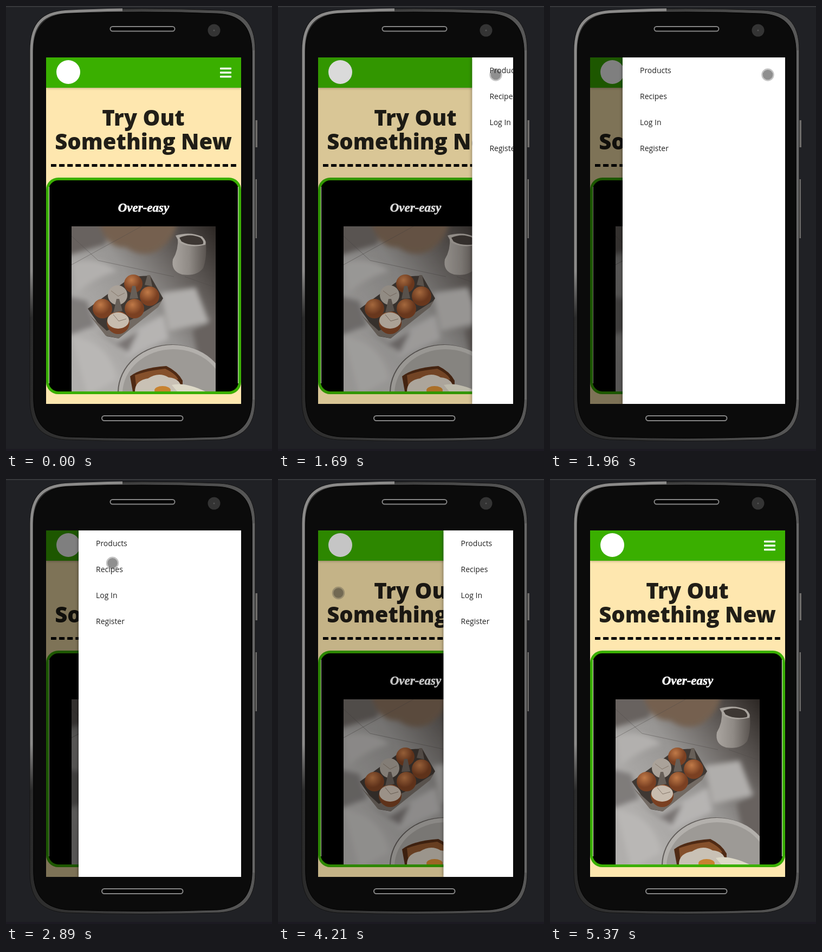
Write an HTML page that moves like this. It is 491 px wide and 822 px high and loops after 5770 ms.

```html
<!DOCTYPE html>
<html lang="en">
<head>
<meta charset="utf-8">
<title>Mobile menu</title>
<style>
  html, body { margin: 0; width: 100%; height: 100%; overflow: hidden; background: #202125; }
  svg { display: block; width: 491px; height: 822px; }
  .title { font: 800 40px "Open Sans", sans-serif; fill: #211e17; text-anchor: middle; }
  .dish { font: italic bold 23px "Liberation Serif", serif; fill: #fff; stroke: #fff; stroke-width: .6px; text-anchor: middle; }
  .menu { font: 14px "Open Sans", sans-serif; fill: #212121; }
  .bar { filter: drop-shadow(0 1px 2px #0004); }
  .panel { filter: drop-shadow(0 1px 3px #0007); }
</style>
</head>
<body>
<svg viewBox="0 0 491 822">
  <defs>
    <path id="body" d="M44 82C44 28 70 10 110 8Q252 2 394 8C434 10 460 28 460 82V727C460 780 434 798 394 801Q252 806 110 801C70 798 44 780 44 727Z"/>
    <clipPath id="screen"><path d="M74 95h360v640H74z"/></clipPath>
    <clipPath id="photo"><path d="M121 407h266v305H121z"/></clipPath>
    <linearGradient id="rim">
      <stop stop-color="#2b2b2b"/>
      <stop offset="1" stop-color="#585858"/>
    </linearGradient>
    <linearGradient id="edge" x2="0" y2="1">
      <stop offset=".85" stop-color="#8c8b8a"/>
      <stop offset="1" stop-color="#2b2b2b"/>
    </linearGradient>
    <linearGradient id="cloth" x1="1" y1="0" x2=".15" y2=".7">
      <stop stop-color="#2c2724"/>
      <stop offset=".3" stop-color="#625d5a"/>
      <stop offset=".6" stop-color="#979593"/>
      <stop offset="1" stop-color="#b0aeac"/>
    </linearGradient>
    <radialGradient id="shell" cx=".4" cy=".3">
      <stop stop-color="#c07a48"/>
      <stop offset="1" stop-color="#7a4022"/>
    </radialGradient>
    <linearGradient id="ceramic">
      <stop stop-color="#aaa5a0"/>
      <stop offset=".5" stop-color="#8f8a85"/>
      <stop offset="1" stop-color="#5a5450"/>
    </linearGradient>
    <filter id="soft"><feGaussianBlur stdDeviation="5"/></filter>
  </defs>

  <!-- phone -->
  <path d="M0 0h491v2H0z" fill="#37383b"/>
  <path d="M0 818h491v4H0z" fill="#1c1a22"/>
  <path d="M459 211h5v50h-5zM459 320h4v109h-4z" fill="#6f6d6b"/>
  <use href="#body" fill="url(#rim)" stroke="#141414"/>
  <path d="M47 575V82C47 30 72 13 110 10.500Q160 8 215 7" fill="none" stroke="url(#edge)" stroke-width="5"/>
  <path d="M457 82V727" stroke="#666" stroke-width="4"/>
  <use href="#body" fill="#0b0b0b" stroke="#000" transform="translate(252.500 405) scale(.97 .986) translate(-252 -404.500)"/>
  <g fill="#050505" stroke="#858585" stroke-width="2">
    <rect x="192.500" y="38" width="119" height="8.500" rx="4.250"/>
    <rect x="177" y="757" width="149.500" height="9" rx="4.500"/>
  </g>
  <circle cx="384" cy="45" r="11.500" fill="#343434"/>
  <circle cx="384" cy="45" r="1.500" fill="#555"/>

  <g clip-path="url(#screen)">
    <path d="M74 95h360v640H74z" fill="#fee7af"/>
    <path class="bar" d="M74 95h360v56H74z" fill="#3aaf00"/>
    <circle cx="115" cy="122" r="22" fill="#fff"/>
    <g fill="#fff">
      <rect x="395" y="113.800" width="21" height="3.400" rx=".8"/>
      <rect x="395" y="121.300" width="21" height="3.400" rx=".8"/>
      <rect x="395" y="128.800" width="21" height="3.400" rx=".8"/>
    </g>
    <text class="title" x="253.500" y="221">Try Out</text>
    <text class="title" x="253.500" y="265">Something New</text>
    <path d="M83 294.500h342" stroke="#000" stroke-width="5" stroke-dasharray="10 5.090"/>

    <rect x="76.500" y="319.500" width="355" height="395" rx="20" stroke="#3aaf00" stroke-width="5"/>
    <path d="M79.500 334v363M428.500 334v363" stroke="#e9e5db"/>
    <text class="dish" x="254" y="380">Over-easy</text>

    <g clip-path="url(#photo)">
      <path d="M121 407h266v305H121z" fill="url(#cloth)"/>
      <g filter="url(#soft)">
        <path d="M110 400H185V440L110 462Z" fill="#67625f"/>
        <path d="M172 400H316Q310 432 280 452Q250 466 222 446Q185 448 172 400Z" fill="#75614f"/>
        <path d="M121 475Q170 460 205 490Q165 500 130 530Z" fill="#b2b0ae"/>
        <path d="M110 535L150 545L165 590L110 610Z" fill="#7f7c7a"/>
        <path d="M285 530L350 520L375 585L300 600Z" fill="#b0aeac"/>
        <path d="M345 600L395 570V720H370Z" fill="#67625f"/>
        <path d="M200 620L290 570L300 615L225 650Z" fill="#b6b4b2"/>
        <path d="M121 610Q190 620 205 690L150 720Z" fill="#b9b7b5"/>
        <path d="M160 595L205 622L245 600L225 640Z" fill="#797573"/>
      </g>
      <path d="M121 478L250 407M121 425L170 470L310 500M330 500L387 520" fill="none" stroke="#4f4a47" opacity=".45"/>

      <path d="M317 427Q319 450 308 468Q304 490 325 496Q352 500 364 484Q371 466 369 436L362 425Z" fill="url(#ceramic)"/>
      <path d="M313 424Q340 416 362 426Q371 434 368 441Q340 448 320 437Z" fill="#a9a49e"/>
      <path d="M320 428Q340 419 359 428Q367 436 363 440Q340 444 324 435Z" fill="#3d3733"/>

      <path d="M151 559L232 500L266 498L290 540L280 555L208 614L186 610Z" fill="#3f3833"/>
      <path d="M154 571L186 600L234 578L288 544L281 556L208 614L184 609Z" fill="#726a63"/>
      <g fill="url(#shell)">
        <circle cx="235" cy="513" r="17"/>
        <circle cx="265" cy="536" r="18"/>
        <circle cx="178" cy="559" r="18"/>
        <circle cx="237" cy="559" r="18"/>
        <circle cx="207" cy="585" r="21"/>
      </g>
      <circle cx="206" cy="534" r="18" fill="#aaa299"/>
      <ellipse cx="207" cy="581" rx="20" ry="15" fill="#c8bcae"/>
      <path d="M198 570L208 582L222 578M194 526L207 536L219 530" fill="none" stroke="#85776a"/>
      <path d="M198 567L204 541H209L215 563ZM228 541L233 517H239L244 540ZM256 515L261 497H266L270 518Z" fill="#675f58"/>

      <ellipse cx="306" cy="714" rx="100" ry="89" fill="#5f5b58"/>
      <ellipse cx="308" cy="714" rx="100" ry="88" fill="#b3b0ac"/>
      <ellipse cx="309" cy="716" rx="94" ry="82" fill="#9d9a96"/>
      <path d="M229 684Q250 668 296 665Q317 675 326 692V712H234Z" fill="#4f2a14"/>
      <path d="M238 682Q258 674 294 670Q314 680 318 690L240 700Z" fill="#85502b"/>
      <path d="M238 712Q238 692 262 688Q282 675 300 686Q325 688 324 712Z" fill="#c9c1b5"/>
      <ellipse cx="289" cy="710" rx="15" ry="8" fill="#c8822f"/>
      <path d="M306 700Q330 694 368 712H316Z" fill="#ddd9c8"/>
    </g>

    <path id="shade" d="M74 95h360v640H74z"/>
    <g id="drawer">
      <path class="panel" d="M134 95h300v640H134z" fill="#fff"/>
      <g class="menu">
        <text x="166" y="124">Products</text>
        <text x="166" y="172">Recipes</text>
        <text x="166" y="220">Log In</text>
        <text x="166" y="268">Register</text>
      </g>
    </g>
  </g>

  <g id="touch">
    <circle r="10.500" fill="none" stroke="#3c3c3c" stroke-opacity=".3" stroke-width="2.500"/>
    <circle r="9.300" fill="#202020" fill-opacity=".5"/>
  </g>
  <path id="arrow" d="M.5 .5V16L4 12.700L6.500 18.500L9 17.500L6.600 11.800H11.300Z" fill="#fff" stroke="#000"/>
</svg>
<script>
const LOOP = 5770, OPEN_AT = 1651, CLOSE_AT = 4135;
const $ = id => document.getElementById(id);
const [shade, drawer, touch, arrow] = ["shade", "drawer", "touch", "arrow"].map($);

// Bursts of screen updates: first, last, count
const bursts = [
  [390, 950, 9], [1020, 1350, 6], [1550, 1550, 1], [1690, 1960, 5], [2290, 2820, 9],
  [2890, 3450, 8], [3520, 3730, 4], [4060, 4340, 5], [4600, 5170, 9], [5230, 5370, 3]
];
// Pointer path: time, x, y
const path = [
  [390, 455, 803], [530, 449, 610], [670, 430, 430], [810, 408, 270], [950, 402, 195],
  [1020, 402, 172], [1150, 402, 147], [1350, 402, 128], [1550, 402, 127], [2220, 402, 127],
  [2360, 365, 125], [2560, 275, 117], [2820, 199, 132], [3130, 188, 235], [3290, 180, 280],
  [3450, 126, 233], [3730, 111.5, 210.5], [4530, 111.5, 210.5], [4600, 125, 235],
  [4880, 300, 559], [5170, 430, 799], [5370, 430, 824]
];

const clamp = v => Math.min(1, Math.max(0, v));
const easeOut = v => 1 - (1 - clamp(v)) ** 2;

function lastUpdate(t) {
  const burst = bursts.findLast(b => b[0] <= t);
  if (!burst) return 0;
  const [first, last, count] = burst;
  const step = (last - first) / (count - 1) || 1;
  return first + step * Math.min(count - 1, Math.floor((t - first) / step + .1));
}

function pointerAt(t) {
  const i = path.findIndex(p => p[0] > t);
  if (i < 1) return null;
  const [a, b] = [path[i - 1], path[i]];
  const k = (t - a[0]) / (b[0] - a[0]);
  return [a[1] + (b[1] - a[1]) * k, a[2] + (b[2] - a[2]) * k];
}

function draw(now) {
  const t = lastUpdate(now % LOOP);
  const open = t < CLOSE_AT ? easeOut((t - OPEN_AT) / 250) : 1 - easeOut((t - CLOSE_AT) / 200);
  shade.setAttribute("opacity", open / 2);
  drawer.setAttribute("transform", `translate(${315 * (1 - open)})`);
  drawer.setAttribute("visibility", open ? "visible" : "hidden");

  const pos = pointerAt(t);
  const onScreen = pos && pos[0] < 434 && pos[1] < 735;
  const pressed = t === 1550 || (t >= 4060 && t < CLOSE_AT);
  touch.setAttribute("visibility", onScreen ? "visible" : "hidden");
  arrow.setAttribute("visibility", pos && !onScreen ? "visible" : "hidden");
  if (pos) {
    touch.setAttribute("transform", `translate(${pos}) scale(${pressed ? 1.27 : 1})`);
    arrow.setAttribute("transform", `translate(${pos.map(Math.round)})`);
  }
  requestAnimationFrame(() => draw(performance.now()));
}
draw(performance.now());
</script>
</body>
</html>
```
